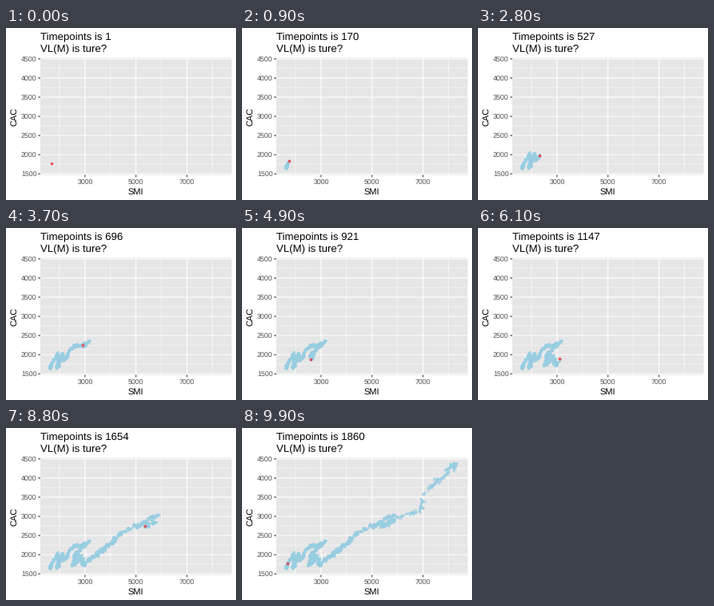
Write a matplotlib script that moves like this. It is 288 by 216 pixels and loops after 10 s.

```python
import numpy as np
import matplotlib.pyplot as plt
from matplotlib.animation import FuncAnimation
from matplotlib.patches import Rectangle

W, H, DPI = 288, 216, 72
FRAMES, INTERVAL = 100, 100
STEP = 18.78                      # timepoints per frame
LEFT, RIGHT, TOP, BOTTOM = 43, 282.5, 37.5, 184.5
SMI, CAC = (1587, 8412), (1611, 4388)
PANEL, BLUE, RED = "#e6e6e6", "#98cde1", "#ea3f47"

plt.rcParams["font.family"] = "Liberation Sans"
plt.rcParams["text.hinting"] = "none"

# Main highs and lows of the series: timepoint, SMI, CAC
TURNS = [
    (1, 1678, 1773), (125, 1595, 1665), (228, 1950, 2050), (339, 1875, 1650),
    (450, 2120, 2020), (490, 2180, 1890), (575, 2480, 2160),
    (665, 3160, 2330), (696, 2895, 2243), (780, 2600, 1930),
    (860, 2640, 2060), (921, 2595, 1870), (970, 2500, 1750),
    (1040, 2820, 1980), (1110, 2980, 1745), (1230, 3480, 1990),
    (1372, 3720, 2130), (1480, 4450, 2590), (1590, 5900, 3050),
    (1654, 5360, 2743), (1745, 6950, 3260), (1772, 7300, 3750),
    (1840, 8300, 4330), (1860, 7680, 4000),
]


def scale(v, limits, start, end):
    """Map data to pixels with a 5% margin at both ends."""
    lo, hi = limits
    pad = 0.05 * (hi - lo)
    return start + (v - lo + pad) / (hi - lo + 2 * pad) * (end - start)


def px(v):
    return scale(v, SMI, LEFT, RIGHT)


def py(v):
    return scale(v, CAC, BOTTOM, TOP)


def make_series():
    """Trend between the turns plus correlated noise that vanishes at each."""
    rng = np.random.default_rng(7)
    turns, *levels = np.array(TURNS).T
    t = np.arange(1, turns[-1] + 1)
    decay = 0.82 ** np.arange(40)
    shared, *own = [np.convolve(rng.normal(size=len(t)), decay)[:len(t)]
                    for _ in range(3)]
    series = []
    for level, extra, limits in zip(levels, own, (SMI, CAC)):
        noise = 0.6 * shared + 0.8 * extra
        noise -= np.interp(t, turns, noise[turns - 1])
        value = np.interp(t, turns, level) * (1 + 0.0085 * noise)
        series.append(np.clip(value, *limits))
    return np.column_stack([px(series[0]), py(series[1])])


points = make_series()

fig = plt.figure(figsize=(W / DPI, H / DPI), dpi=DPI, facecolor="white")
ax = fig.add_axes([0, 0, 1, 1])
ax.set(xlim=(0, W), ylim=(H, 0))
ax.axis("off")


def line(xs, ys, color="white", width=1.07):
    ax.plot(xs, ys, color=color, lw=width, zorder=1, snap=False,
            solid_capstyle="butt")


def label(x, y, s, size, color="black", **kw):
    return ax.text(x, y, s, fontsize=size, color=color, va="baseline", **kw)


def dots(size, color, alpha, z):
    return ax.scatter([], [], s=size ** 2, color=color, alpha=alpha,
                      linewidths=0, zorder=z)


ax.add_patch(Rectangle((LEFT, TOP), RIGHT - LEFT, BOTTOM - TOP, fc=PANEL,
                       ec="none", zorder=0, snap=False))

for v in range(2000, 8001, 2000):
    line([px(v)] * 2, [TOP, BOTTOM], width=0.53)
for v in range(3000, 7001, 2000):
    line([px(v)] * 2, [TOP, BOTTOM])
    line([px(v)] * 2, [BOTTOM, BOTTOM + 2.75], "#333333")
    label(px(v), 195.8, str(v), 8.8, "#4d4d4d", ha="center")

for v in range(1750, 4500, 500):
    line([LEFT, RIGHT], [py(v)] * 2, width=0.53)
for v in range(1500, 4501, 500):
    line([LEFT, RIGHT], [py(v)] * 2)
    line([LEFT - 2.75, LEFT], [py(v)] * 2, "#333333")
    label(38.4, py(v) + 3.15, str(v), 8.8, "#4d4d4d", ha="right")

label((LEFT + RIGHT) / 2, 209, "SMI", 11, ha="center")
label(13.4, (TOP + BOTTOM) / 2, "CAC", 11, ha="center", rotation=90,
      rotation_mode="anchor")
title = label(LEFT, 15, "", 13.2)
label(LEFT, 30, "VL(M) is ture?", 13.2)

trail = dots(2.9, BLUE, 0.8, 3)
head = dots(3.7, RED, 0.87, 4)


def update(i):
    n = 1 + round(STEP * i)
    title.set_text(f"Timepoints is {n}")
    trail.set_offsets(points[:n - 1])
    # The marker returns to the start as the loop closes
    head.set_offsets(points[[0 if i == FRAMES - 1 else n - 1]])
    return title, trail, head


anim = FuncAnimation(fig, update, frames=FRAMES, interval=INTERVAL,
                     init_func=lambda: update(0), repeat=True, repeat_delay=0)
plt.show()
```
